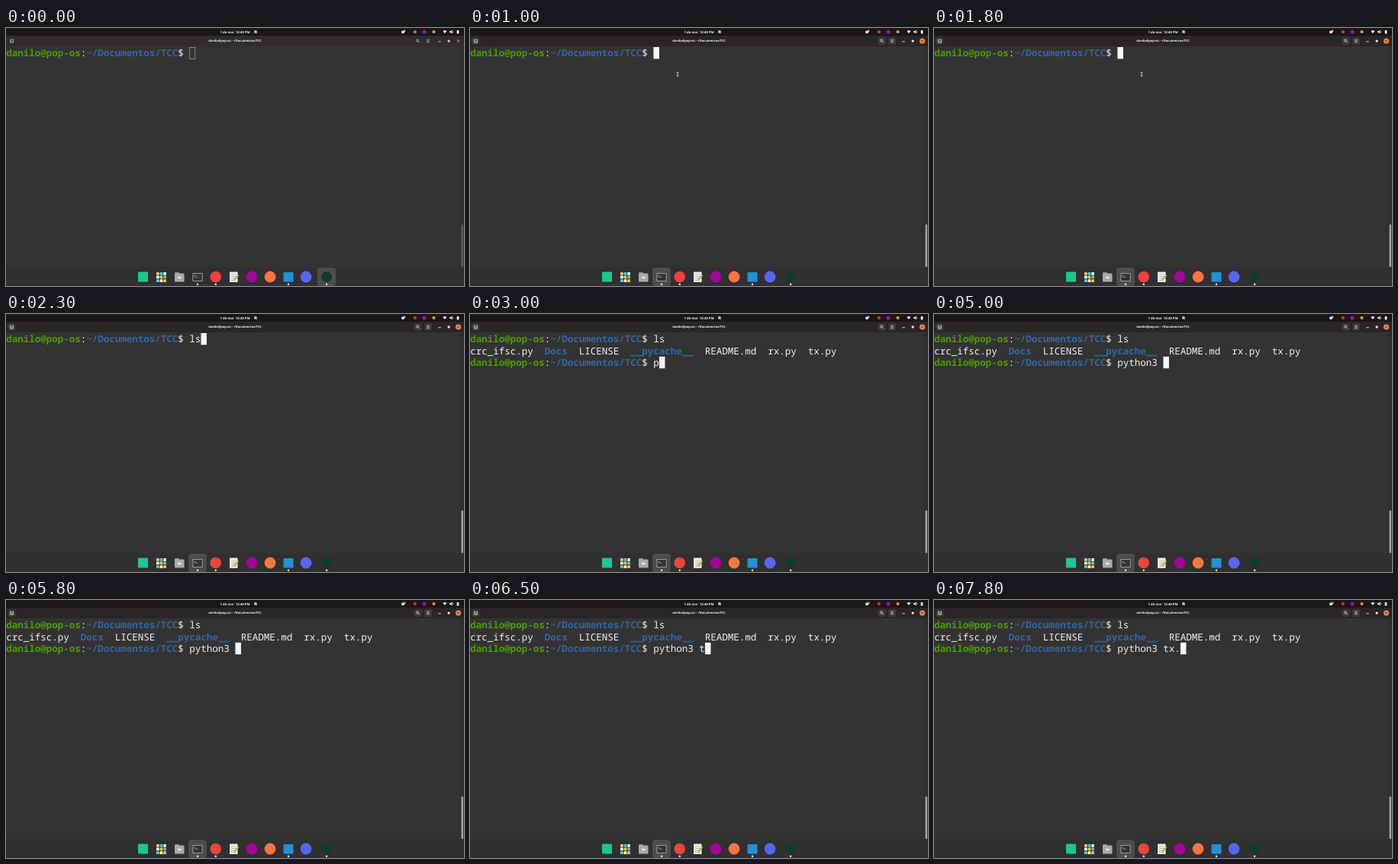
An HTML page with a canvas for the animation above (8000 ms loop, 600 by 338 pixels).

```html
<!DOCTYPE html>
<html lang="pt">
<head>
<meta charset="utf-8">
<style>
  html, body { margin: 0; width: 100%; height: 100%; overflow: hidden; background: #333; }
  canvas { display: block; }
</style>
</head>
<body>
<canvas id="stage" width="600" height="338"></canvas>
<script>
const ctx = document.getElementById('stage').getContext('2d');
ctx.textRendering = 'geometricPrecision';

const LOOP = 8000, CELL = 7.5, LINE = 15.4;
const FOCUS_AT = 1000, LIST_AT = 2500;
const GREEN = '#4e9a06', BLUE = '#3465a4', WHITE = '#f2f2f2';
const USER = 'danilo@pop-os', DIR = '~/Documentos/TCC';
const FIRST_KEYS = [2000, 2300];
const SECOND_KEYS = [3000, 3300, 3500, 3800, 4000, 4300, 4500, 4800, 6000, 7000, 7500];

function rect(x, y, w, h, color, radius = 0) {
  ctx.fillStyle = color;
  ctx.beginPath();
  ctx.roundRect(x, y, w, h, radius);
  ctx.fill();
}

function circle(x, y, r, color) {
  ctx.fillStyle = color;
  ctx.beginPath();
  ctx.arc(x, y, r, 0, Math.PI * 2);
  ctx.fill();
}

function line(color, width, ...points) {
  ctx.strokeStyle = color;
  ctx.lineWidth = width;
  ctx.beginPath();
  points.forEach(([x, y]) => ctx.lineTo(x, y));
  ctx.stroke();
}

function label(text, x, y, size) {
  ctx.font = `bold ${size}px "Open Sans", "Noto Sans", sans-serif`;
  ctx.textAlign = 'center';
  ctx.fillStyle = WHITE;
  ctx.fillText(text, x, y);
}

// Terminal text sits on a fixed character grid; returns the next column.
function print(text, col, row, color = WHITE, bold = false) {
  ctx.font = `${bold ? 'bold ' : ''}12.5px "Noto Sans Mono", monospace`;
  ctx.textAlign = 'left';
  ctx.fillStyle = color;
  for (const char of text) ctx.fillText(char, CELL * col++ + 0.3, 37.2 + LINE * row);
  return col;
}

function prompt(row, command) {
  let col = print(USER, 0, row, GREEN, true);
  col = print(':', col, row);
  col = print(DIR, col, row, BLUE, true);
  return print('$ ' + command, col, row);
}

function cursor(col, row, focused) {
  const x = CELL * col + 0.4, y = 25 + LINE * row;
  if (focused) return rect(x, y, CELL, LINE, '#f6f6f6');
  ctx.strokeStyle = '#a4a4a4';
  ctx.lineWidth = 0.7;
  ctx.strokeRect(x + 0.2, y + 0.4, CELL - 0.4, LINE - 0.5);
}

const typed = (text, keys, t) => text.slice(0, keys.filter(key => t >= key).length);

function topBar(t) {
  rect(0, 0, 600, 10.5, '#1b1717');
  label('1 de mai  12:40 PM', 300, 6.7, 4.3);
  circle(327, 4.6, 1.5, WHITE);
  rect(325, 5.5, 4, 1, WHITE);
  line('#1b1717', 0.5, [325, 2.5], [329, 7]);
  line(WHITE, 0.5, [324.8, 3], [329, 7.2]);
  rect(518, 3.5, 4, 3.5, '#d5d5d5', 1);
  rect(521, 2.8, 2.2, 2, '#d5d5d5', 0.5);
  rect(534, 3, 3.5, 4, t < 500 ? '#8a8585' : '#d5303e', 0.5);
  circle(548, 5, 2.6, '#a806a8');
  circle(560.5, 5, 2.1, '#e89a3c');
  ctx.fillStyle = WHITE;
  ctx.beginPath();
  ctx.moveTo(572.3, 4);
  ctx.quadraticCurveTo(574.8, 2, 577.3, 4);
  ctx.lineTo(574.8, 7);
  ctx.fill();
  rect(581, 4, 1.5, 2, WHITE);
  line(WHITE, 1, [582.5, 5], [584, 3], [584, 7], [582.5, 5]);
  line(WHITE, 0.5, [585.5, 3.5], [586, 5], [585.5, 6.5]);
  rect(590.7, 3, 2.6, 4.4, WHITE, 0.5);
}

function titleBar(focused) {
  rect(0, 10.5, 600, 13.5, focused ? '#2a2626' : '#302d2c');
  if (focused) [7.5, 539.5, 553].forEach(x => rect(x - 5, 12, 10, 10, '#3c3838', 2));
  const ink = focused ? WHITE : '#d0d0d0';
  label(`${USER}: ${DIR}`, 300, 18.4, 4);
  ctx.strokeStyle = ink;
  ctx.lineWidth = 0.7;
  ctx.strokeRect(5.7, 15.2, 3.6, 2.8);
  line(ink, 0.7, [5, 19], [10, 19]);
  ctx.beginPath();
  ctx.arc(539, 16.4, 1.5, 0, Math.PI * 2);
  ctx.stroke();
  line(ink, 0.8, [540, 17.5], [541.7, 19.2]);
  [15.3, 17, 18.7].forEach(y => line(ink, 0.6, [551, y], [555, y]));
  line(ink, 0.8, [566, 17.8], [569.8, 17.8]);
  rect(578.7, 15.7, 2.8, 2.8, ink, 0.4);
  if (focused) circle(592.5, 17, 3.6, '#f08a4b');
  const cross = focused ? '#4a2a18' : ink;
  line(cross, 0.7, [591, 15.5], [594, 18.5]);
  line(cross, 0.7, [594, 15.5], [591, 18.5]);
}

function dock(focused) {
  rect(0, 313.5, 600, 24.5, '#303030');
  rect(focused ? 239 : 408, 314, 24, 24, '#4d4d4d', 4);
  rect(173, 319.5, 13, 13, '#22c58b', 1);

  const tiles = ['#f5c84c', '#62c6d8', '#f7f7f7'];
  for (let i = 0; i < 9; i++) {
    const column = i % 3, row = Math.floor(i / 3);
    rect(197 + column * 4.6, 320 + row * 4.6, 3.7, 3.7, tiles[(column + row * 2) % 3], 0.5);
  }

  rect(221, 320, 6, 4, '#8d9698', 1);
  rect(221, 321.5, 12.5, 11, '#a5adaf', 1);
  rect(225, 326, 4.5, 2, '#ececec', 0.5);

  rect(244.5, 321, 13, 11, '#b8b8b8', 1);
  rect(245.3, 321.8, 11.4, 9.4, '#343434', 0.5);
  line(WHITE, 0.6, [247, 324], [248.5, 325], [247, 326]);
  line(WHITE, 0.6, [249.2, 326.4], [251.2, 326.4]);

  circle(274.7, 326, 7.3, '#e84538');

  rect(293, 319.5, 10.5, 13.5, '#eeeeec', 0.5);
  [323, 325.5, 328, 330.5].forEach(y => line('#999', 0.6, [295, y], [301, y]));
  line('#d9a62c', 2, [299, 330], [304.5, 323.5]);

  circle(322, 326, 7.4, '#a0059a');
  circle(346, 326, 7.4, '#f47542');
  rect(363.5, 320, 13, 12.5, '#238fd8', 1);
  circle(393, 326, 7.4, '#5865f2');
  circle(420, 326, 7, '#14392f');
  [251, 274.7, 370, 420].forEach(x => circle(x, 335.7, 1.2, WHITE));
}

function terminal(t, focused) {
  let row = 0;
  let col = prompt(0, typed('ls', FIRST_KEYS, t));
  if (t >= LIST_AT) {
    print('crc_ifsc.py', 0, 1);
    print('Docs', 13, 1, BLUE, true);
    print('LICENSE', 19, 1);
    print('__pycache__', 28, 1, BLUE, true);
    print('README.md  rx.py  tx.py', 41, 1);
    row = 2;
    col = prompt(2, typed('python3 tx.', SECOND_KEYS, t));
  }
  cursor(col, row, focused);
  rect(595.5, 24, 4.5, 289.5, '#2e2e2e');
  rect(596.5, 257.3, 2.6, 56, focused ? '#a2a2a2' : '#5e5e5e', 1.2);
}

function pointer() {
  line(WHITE, 0.8, [272, 58.3], [272, 62.7]);
  [58.2, 62.8].forEach(y => line(WHITE, 0.8, [270.5, y], [273.5, y]));
}

function frame(now) {
  const t = now % LOOP, focused = t >= FOCUS_AT;
  rect(0, 0, 600, 338, '#333');
  topBar(t);
  titleBar(focused);
  terminal(t, focused);
  dock(focused);
  if (focused && t < FIRST_KEYS[0]) pointer();
  requestAnimationFrame(frame);
}
requestAnimationFrame(frame);
</script>
</body>
</html>
```
